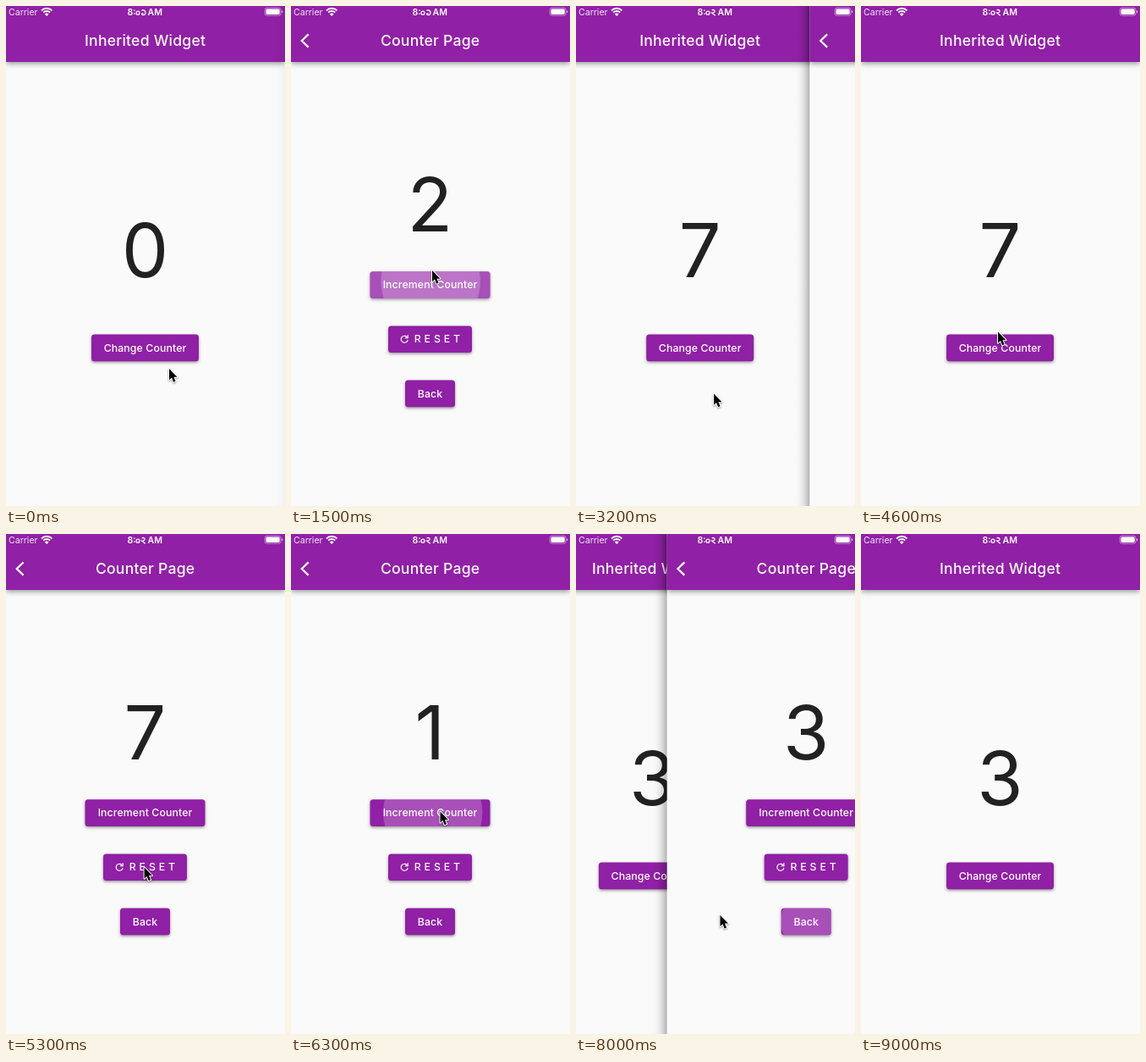
An HTML page with a canvas that plays this animation: 330x590 px, repeating every 10 s.

```html
<!DOCTYPE html>
<html lang="en">
<head>
<meta charset="utf-8">
<title>Inherited Widget</title>
<style>
html, body { margin: 0; width: 100%; height: 100%; overflow: hidden; background: #fafafa; }
canvas { display: block; width: 330px; height: 590px; }
</style>
</head>
<body>
<canvas id="stage"></canvas>
<script>
const W = 330, H = 590, LOOP = 10000, STEP = 100;
const PURPLE = '#9020a5', PAPER = '#fafafa', INK = '#212121';
const FONT = 'Inter, Roboto, sans-serif';
const canvas = document.getElementById('stage');
const ctx = canvas.getContext('2d');
const dpr = window.devicePixelRatio || 1;
canvas.width = W * dpr;
canvas.height = H * dpr;

const buttons = {
  change: { x: 101, y: 387.6, w: 127, label: 'Change Counter' },
  add: { x: 93.5, y: 313.3, w: 142, label: 'Increment Counter' },
  reset: { x: 115, y: 377.4, w: 99, label: '' },
  back: { x: 135, y: 441.6, w: 59, label: 'Back' }
};
const BH = 31.7;

// time, button, x, y
const taps = [
  [325, 'change', 165, 395],
  ...[1155, 1355, 1555, 1755, 1955, 2155, 2355].map(t => [t, 'add', 167, 314]),
  [2900, 'back', 163, 455],
  [4740, 'change', 163, 393],
  [5600, 'reset', 165, 392],
  ...[6155, 6400, 6630].map(t => [t, 'add', 176, 327]),
  [7810, 'back', 170, 456]
];

// time, x, y
const track = [
  [0, 193, 428], [100, 187, 420], [300, 165, 396], [400, 165, 394],
  [700, 165, 378], [1000, 167, 314], [1100, 167, 312], [2400, 167, 312],
  [2800, 163, 449], [3200, 163, 457.5], [3900, 163, 452], [4600, 162, 384.5],
  [4800, 163, 392], [5100, 163, 394], [5800, 165, 392], [6150, 176.5, 327.5],
  [6700, 176.5, 327.5], [7000, 171, 449], [7300, 170, 455], [7700, 170, 455.5],
  [8300, 171, 444], [8600, 160, 330], [8900, 235, 9]
];

const clamp = v => Math.max(0, Math.min(1, v));
const mix = (a, b, k) => a + (b - a) * k;
const easeOut = k => 1 - (1 - k) ** 1.25;

// cubic-bezier(.35, .91, .33, .97)
function settle(k) {
  k = clamp(k);
  if (k === 0 || k === 1) return k;
  const bez = (a, b, u) => 3 * (1 - u) ** 2 * u * a + 3 * (1 - u) * u * u * b + u ** 3;
  let lo = 0, hi = 1;
  for (let i = 0; i < 24; i++) {
    const mid = (lo + hi) / 2;
    if (bez(.35, .33, mid) < k) lo = mid; else hi = mid;
  }
  return bez(.91, .97, lo);
}

function pageShown(t) {
  const run = start => settle((t - start) / 400);
  if (t < 700) return 0;
  if (t < 3045) return run(440);
  if (t < 5000) return 1 - run(3045);
  if (t < 7950) return run(4843);
  return 1 - run(7950);
}

function countAt(t) {
  let n = 0;
  for (const [at, id] of taps) {
    if (t < at + 100) break;
    if (id === 'add') n++;
    if (id === 'reset') n = 0;
  }
  return n;
}

function text(str, x, y, size, weight, color, align = 'center', spacing = 0) {
  ctx.font = `${weight} ${size}px ${FONT}`;
  ctx.letterSpacing = spacing + 'px';
  ctx.textAlign = align;
  ctx.fillStyle = color;
  ctx.fillText(str, x, y);
}

function line(points, width, color = '#fff') {
  ctx.beginPath();
  points.forEach(([x, y]) => ctx.lineTo(x, y));
  ctx.lineWidth = width;
  ctx.strokeStyle = color;
  ctx.stroke();
}

function box(x, y, w, h, r) {
  ctx.beginPath();
  ctx.roundRect(x, y, w, h, r);
}

function shadow(alpha, blur, dy) {
  ctx.shadowColor = `rgba(0,0,0,${alpha})`;
  ctx.shadowBlur = blur * dpr;
  ctx.shadowOffsetY = dy * dpr;
}

function drawButton(id, t) {
  const b = buttons[id];
  const cx = b.x + b.w / 2, cy = b.y + BH / 2;
  ctx.save();
  shadow(.4, 3.5, 1.5);
  ctx.fillStyle = PURPLE;
  box(b.x, b.y, b.w, BH, 3.5);
  ctx.fill();
  ctx.restore();

  ctx.save();
  box(b.x, b.y, b.w, BH, 3.5);
  ctx.clip();
  for (const [at, target, x, y] of taps) {
    const age = t - at;
    if (target !== id || age < 0 || age > 700) continue;
    const k = easeOut(clamp(age / 225));
    const alpha = .21 * (1 - clamp((age - 350) / 350));
    ctx.fillStyle = `rgba(255,255,255,${alpha})`;
    ctx.beginPath();
    ctx.arc(mix(x, cx, k), mix(y, cy, k), Math.hypot(b.w, BH) / 2 * mix(.3, 1, k), 0, 7);
    ctx.fill();
  }
  ctx.restore();

  if (id === 'reset') drawReset(cy);
  else text(b.label, cx, cy + 4.2, 12.32, 500, '#fff', 'center', .1);
}

function drawReset(cy) {
  const x = 134.2, r = 4;
  ctx.beginPath();
  ctx.arc(x, cy, r, .2, Math.PI * 2 - .65);
  ctx.lineWidth = 1.2;
  ctx.strokeStyle = '#fff';
  ctx.stroke();
  line([[x + r, cy - 5], [x + r, cy - 1.7], [x + r - 3.3, cy - 1.7]], 1.2);
  text('RESET', 145.7, cy + 4.2, 12.32, 500, '#fff', 'left', 3.9);
}

function drawPage(title, count, baseline, ids, t) {
  ctx.fillStyle = PAPER;
  ctx.fillRect(0, 0, W, H);
  ctx.save();
  shadow(.4, 6, 2);
  ctx.fillStyle = PURPLE;
  ctx.fillRect(0, 0, W, 66);
  ctx.restore();
  text(title, 164.6, 47, 17.6, 500, '#fdf8fe', 'center', .22);
  text(count, 164.4, baseline, 88, 400, INK);
  ids.forEach(id => drawButton(id, t));
}

function edgeShadow(x, alpha) {
  const g = ctx.createLinearGradient(x - 17, 0, x, 0);
  for (let i = 0; i <= 4; i++) g.addColorStop(i / 4, `rgba(0,0,0,${alpha * (i / 4) ** 2})`);
  ctx.fillStyle = g;
  ctx.fillRect(x - 17, 0, 17, H);
}

function drawStatus(t) {
  text('Carrier', 3, 11, 10.56, 400, '#f3e4f6', 'left');
  text('8:', 143.5, 11, 10.56, 600, '#fff', 'left');
  text('AM', 185, 11, 10.56, 600, '#fff', 'right');
  ctx.strokeStyle = '#fff';
  ctx.lineWidth = 1.2;
  ctx.beginPath();
  ctx.arc(156, 8.2, 2, 0, 7);
  ctx.stroke();
  ctx.beginPath();
  if (t < 2300) {
    ctx.moveTo(160.3, 5.6);
    ctx.bezierCurveTo(162, 4, 165.2, 5.2, 165, 8);
    ctx.bezierCurveTo(164.7, 11.6, 160.2, 11.2, 160.6, 9.2);
    ctx.quadraticCurveTo(161.4, 7.8, 162.6, 9.2);
  } else {
    ctx.moveTo(160.5, 5);
    ctx.bezierCurveTo(163, 3.6, 165.2, 5.6, 163.4, 7.3);
    ctx.quadraticCurveTo(162, 8.3, 160.8, 8.2);
    ctx.lineTo(164.8, 11.2);
  }
  ctx.stroke();

  // wifi
  ctx.lineWidth = 1.9;
  for (const r of [5.6, 8.8]) {
    ctx.beginPath();
    ctx.arc(48.2, 11.6, r, -Math.PI * .75, -Math.PI * .25);
    ctx.stroke();
  }
  ctx.fillStyle = '#fff';
  ctx.beginPath();
  ctx.moveTo(48.2, 12);
  ctx.arc(48.2, 12, 3.4, -Math.PI * .75, -Math.PI * .25);
  ctx.fill();

  // battery
  ctx.lineWidth = .8;
  ctx.strokeStyle = 'rgba(255,255,255,.6)';
  box(306.2, 2.2, 18.8, 9, 2.4);
  ctx.stroke();
  box(307.5, 3.5, 16.2, 6.4, 1.4);
  ctx.fill();
  ctx.fillStyle = 'rgba(255,255,255,.65)';
  box(326, 5.2, 1.2, 3, .6);
  ctx.fill();
}

function drawCursor(t) {
  const i = track.findIndex(p => p[0] > t);
  if (i < 0 && t > 8900) return;
  const b = track[i < 0 ? track.length - 1 : i];
  const a = i < 0 ? b : track[i - 1];
  const k = a === b ? 0 : (t - a[0]) / (b[0] - a[0]);
  ctx.save();
  ctx.translate(mix(a[1], b[1], k), mix(a[2], b[2], k));
  ctx.scale(.92, .92);
  ctx.beginPath();
  for (const [x, y] of [[0, 0], [0, 14.4], [3.3, 11.4], [5.6, 17], [8.2, 16], [5.9, 10.5], [10.3, 10.5]]) ctx.lineTo(x, y);
  ctx.closePath();
  ctx.lineJoin = 'round';
  ctx.lineWidth = 2.2;
  ctx.strokeStyle = '#fff';
  shadow(.4, 2, 1);
  ctx.stroke();
  shadow(0, 0, 0);
  ctx.fillStyle = '#000';
  ctx.fill();
  ctx.restore();
}

function shownTime(now) {
  const t = Math.floor(now % LOOP / STEP) * STEP;
  if (t > 400 && t < 700) return 400;
  if (t > 7000 && t < 7300) return 7000;
  return Math.min(t, 9000);
}

function draw(t) {
  const p = pageShown(t), count = String(countAt(t));
  const edge = W * (1 - p);
  ctx.setTransform(dpr, 0, 0, dpr, 0, 0);
  ctx.clearRect(0, 0, W, H);

  if (p < 1) {
    ctx.save();
    ctx.translate(-W * p / 3, 0);
    drawPage('Inherited Widget', count, 319.8, ['change'], t);
    ctx.restore();
  }
  if (p > 0) {
    if (p < 1) edgeShadow(edge, .3 * clamp(p / .1));
    ctx.save();
    ctx.translate(edge, 0);
    drawPage('Counter Page', count, 265.6, ['add', 'reset', 'back'], t);
    line([[20.6, 33.4], [12.7, 41], [20.6, 48.6]], 2.2);
    ctx.restore();
  } else if (t < 700) {
    edgeShadow(W, .035);
  }
  drawStatus(t);
  drawCursor(t);
}

const begin = performance.now();
function tick() {
  draw(shownTime(performance.now() - begin));
  requestAnimationFrame(tick);
}
tick();
</script>
</body>
</html>
```
